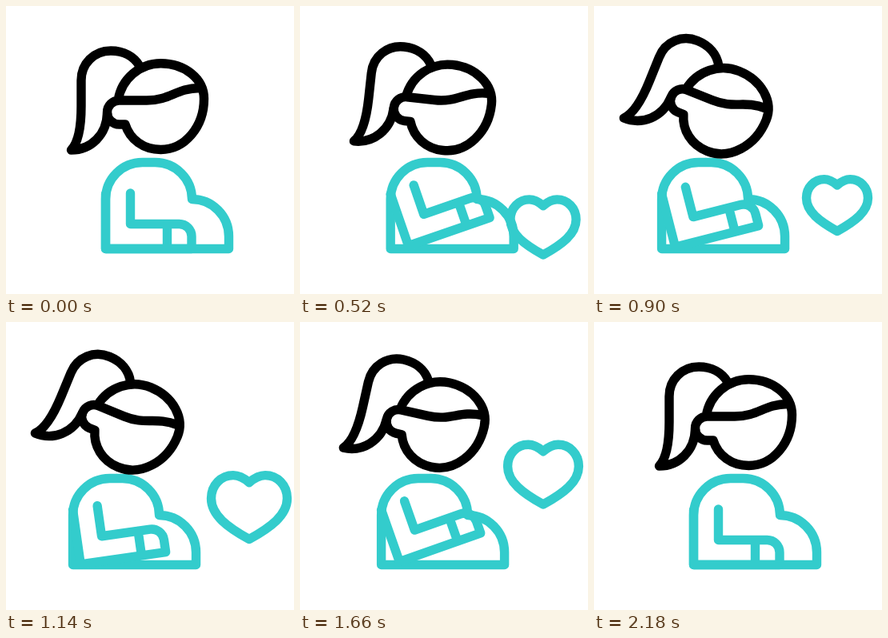
Recreate the animation shown at these times as an HTML page. Size 360 px wide and 360 px high, loop 2400 ms.

```html
<!DOCTYPE html>
<html lang="en">
<head>
<meta charset="utf-8">
<title>Expecting mother</title>
<style>
  html, body { margin: 0; width: 100%; height: 100%; overflow: hidden; background: #fff; }
  svg { display: block; width: 100vw; height: 100vh; }
  path { fill: none; stroke-width: 11.4; stroke-linecap: round; stroke-linejoin: round; }
  .teal { stroke: #33cccc; }
  .ink { stroke: #000; }
</style>
</head>
<body>
<svg viewBox="0 0 360 360">
  <g id="woman">
    <path class="teal" d="M124.5 303.5V241.5A46 46 0 0 1 170.5 195.5H186.5A46 46 0 0 1 232.5 241.5A46 46.5 0 0 1 278.5 288V303.5Z"/>
    <g id="arm" class="teal">
      <path d="M124.5 235V303.5H232V288A15.5 15.5 0 0 0 216.5 272.5H155.5V234M201.5 272.5V303.5"/>
    </g>
    <g id="head" class="ink">
      <path d="M167 75C160 63 147 56 131 56C110 56 94 72 94 93V125C94 150 91 170 81.5 180C106 180 126 161 126.5 134"/>
      <path d="M140.2 117.7A54 54 0 0 1 193.5 71.8C223.5 71.8 247.5 91 247.5 116C247.5 151 223.5 179.5 193.5 179.5C172 179.5 155 167 149 148H141.5A15 15 0 0 1 141.5 118H176C206 118 212 103 242 102.5"/>
    </g>
  </g>
  <path id="heart" class="teal" d="M0 -31C-7 -37 -14 -40 -20 -40C-35 -40 -47.5 -28 -47.5 -11C-47.5 10 -27 25 0 40C27 25 47.5 10 47.5 -11C47.5 -28 35 -40 20 -40C14 -40 7 -37 0 -31Z"/>
</svg>
<script>
const LOOP = 2400, STROKE = 11.4;
const [woman, arm, head, heart] =
  ['woman', 'arm', 'head', 'heart'].map(id => document.getElementById(id));

// [time, value] steps
const LEAN = [[0, 0], [1090, 1], [2165, 0]];
const ARM = [[0, 0], [670, 21.8], [1110, 8], [1600, 20], [2180, 0]];
const PULSE = [[380, 0], [540, 0.9], [760, 0.73], [1150, 1], [1450, 0.73], [1760, 1], [2140, 0]];
const RISE = [[380, 286.7], [1140, 231.7], [1480, 204], [2140, 155.5]];

const linear = u => u;
const smooth = u => u * u * (3 - 2 * u);

// cubic-bezier(.83, 0, .29, 1), solved by bisection
function glide(u) {
  let lo = 0, hi = 1;
  for (let i = 0; i < 24; i++) {
    const s = (lo + hi) / 2, r = 1 - s;
    if (3 * r * r * s * 0.83 + 3 * r * s * s * 0.29 + s * s * s < u) lo = s;
    else hi = s;
  }
  return smooth(lo);
}

function track(steps, ease, t) {
  if (t <= steps[0][0]) return steps[0][1];
  for (let i = 1; i < steps.length; i++) {
    const [a, from] = steps[i - 1], [b, to] = steps[i];
    if (t < b) return from + (to - from) * ease((t - a) / (b - a));
  }
  return steps[steps.length - 1][1];
}

function draw(t) {
  const p = track(LEAN, glide, t);
  woman.setAttribute('transform', `translate(${-41 * p} 0)`);
  head.setAttribute('transform', `rotate(${22.5 * p} 182.5 149)`);
  arm.setAttribute('transform', `rotate(${-track(ARM, smooth, t)} 124.5 235)`);

  const s = track(PULSE, smooth, t);
  heart.style.display = s > 0.01 ? '' : 'none';
  if (s > 0.01) {
    const y = track(RISE, linear, t);
    heart.setAttribute('transform', `translate(304 ${y}) scale(${s})`);
    heart.style.strokeWidth = Math.min(STROKE, 24 * s) / s;
  }
}

const start = performance.now();
function tick() {
  draw((performance.now() - start) % LOOP);
  requestAnimationFrame(tick);
}
tick();
</script>
</body>
</html>
```
